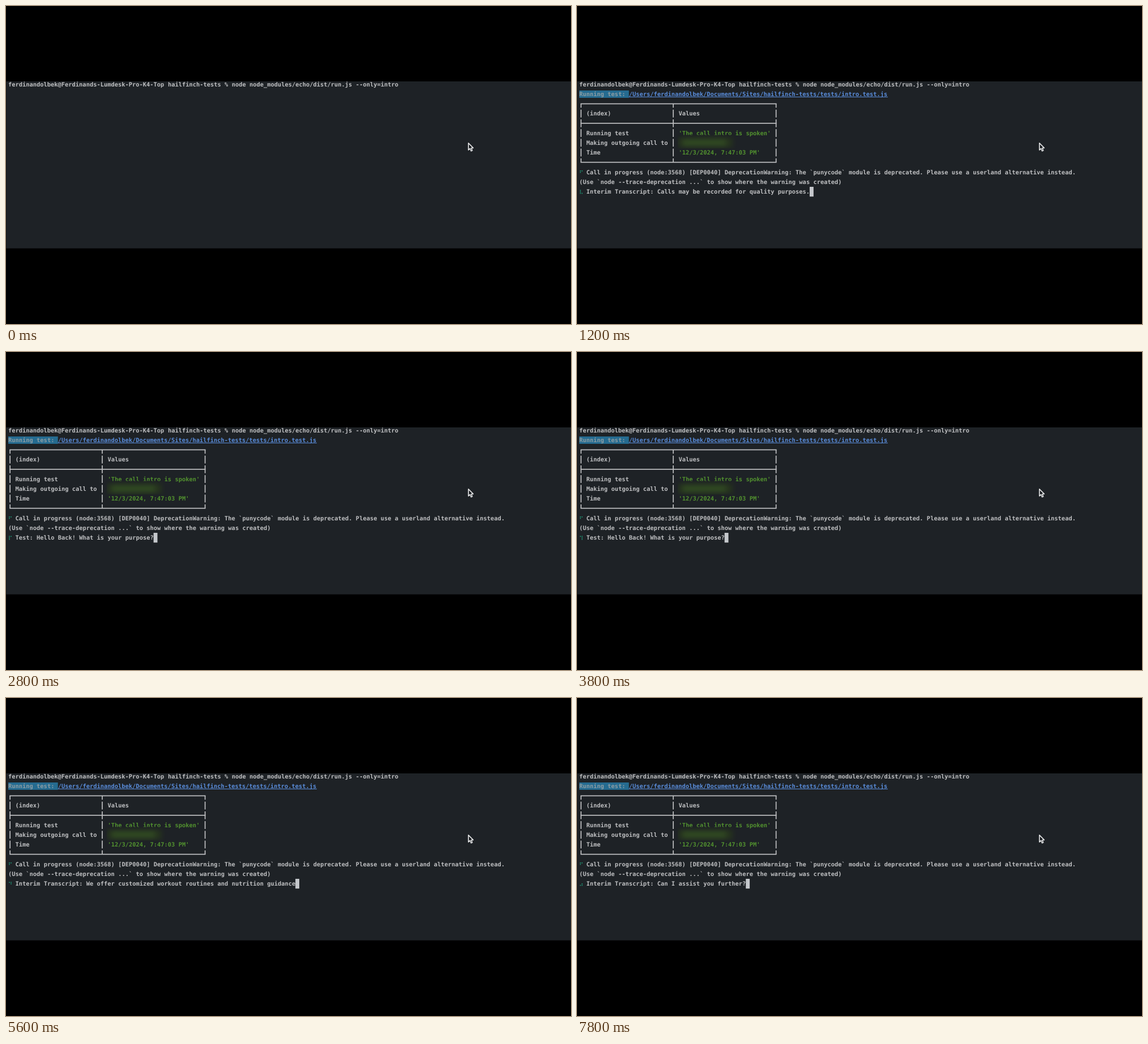
An HTML page with a canvas that plays this animation: 998 by 561 pixels, repeating every 8000 ms.

```html
<!DOCTYPE html>
<html lang="en">
<head>
<meta charset="utf-8">
<title>Terminal call test</title>
<style>
  html, body { margin: 0; width: 100%; height: 100%; overflow: hidden; background: #000; }
  canvas { display: block; }
</style>
</head>
<body>
<canvas id="stage" width="998" height="561"></canvas>
<script>
const ctx = document.getElementById('stage').getContext('2d');

const LOOP = 8000, STEP = 200;
const LEFT = 4, COL = 6.264, TOP = 138.1, ROW = 17.2;
const BG = '#1e2226', GREY = '#bebfc1', GREEN = '#52922f', BLUE = '#5a8ddb', TEAL = '#1fa07c';

const USER = 'ferdinandolbek', PROJECT = 'hailfinch-tests';
const PROMPT = USER + '@Ferdinands-Lumdesk-Pro-K4-Top ' + PROJECT +
  ' % node node_modules/echo/dist/run.js --only=intro';
const PATH = '/Users/' + USER + '/Documents/Sites/' + PROJECT + '/tests/intro.test.js';
const CALL = 'Call in progress';
const WARNING = CALL + ' (node:3568) [DEP0040] DeprecationWarning: The `punycode` module is ' +
  'deprecated. Please use a userland alternative instead.';
const HINT = '(Use `node --trace-deprecation ...` to show where the warning was created)';
const HEARD = 'Interim Transcript: ';

// Each line: start time, label, text, characters at start, characters per step, spinner phase
const LINES = [
  [600, '', CALL, 16, 0, 0],
  [800, HEARD, 'Calls may be recorded for quality purposes.', 3, 20, 2],
  [1400, HEARD, 'Hello! This is your virtual fitness coach, here to guide your journey.', 10, 20, 9],
  [2200, HEARD, 'How can I support your training plan today?', 22, 21, 2],
  [2600, 'Test: ', 'Hello Back! What is your purpose?', 33, 0, 7],
  [4400, HEARD, 'Our purpose is to provide personalized fitness plans', 16, 18, 7],
  [5200, HEARD, 'We offer customized workout routines and nutrition guidance' +
    ' tailored to your individual fitness goals.', 16, 21.5, 6],
  [6200, HEARD, 'The goal is to help you reach your fitness targets anytime and anywhere with a flex', 3, 20, 2],
  [7200, HEARD, 'Let me know if you need any help.', 33, 0, 8],
  [7400, HEARD, 'Can I assist you further?', 5, 10, 0]
];

// Braille dots: bits 0-2 are the left column, bits 3-5 the right one
const SPIN = [...'⠋⠙⠹⠸⠼⠴⠦⠧⠇⠏'].map(c => c.codePointAt(0) - 0x2800);

const colX = col => LEFT + col * COL;
const rowY = row => TOP + row * ROW;

function box(x, y, w, h, color) {
  ctx.fillStyle = color;
  ctx.fillRect(x, y, w, h);
}

// Words are anchored to the character grid
function write(text, col, row, color = GREY) {
  ctx.fillStyle = color;
  const base = Math.round(rowY(row) + 3.7);
  for (const word of text.matchAll(/\S+/g)) {
    ctx.fillText(word[0], colX(col + word.index), base);
  }
}

function spinner(row, phase) {
  const bits = SPIN[Math.floor(phase) % SPIN.length];
  for (let i = 0; i < 6; i++) {
    if (bits >> i & 1) {
      box(i < 3 ? 5.2 : 8.2, rowY(row) - 2.8 + (i % 3) * 2.6, 1.6, 1.6, TEAL);
    }
  }
}

function caret(col, row) {
  box(colX(col) - 0.2, rowY(row) - 8.3, COL + 0.6, ROW, '#c5c8cc');
}

function tableLines() {
  const edges = [0.5, 26.5, 55.5].map(colX);
  const half = 6.9, thick = 1.7;
  for (let row = 2; row <= 8; row++) {
    const y = rowY(row);
    const from = row === 2 ? y : y - half;
    const to = row === 8 ? y : y + half;
    for (const x of edges) box(x - thick / 2, from, thick, to - from, GREY);
    if (row === 2 || row === 4 || row === 8) {
      box(edges[0] - thick / 2, y - thick / 2, edges[2] - edges[0] + thick, thick, GREY);
    }
  }
}

function redaction() {
  box(177.5, 227.5, 104, 24, BG);
  ctx.save();
  ctx.beginPath();
  ctx.rect(177.5, 227.5, 104, 24);
  ctx.clip();
  ctx.filter = 'blur(4px)';
  box(178, 232, 97, 18, '#26331f');
  box(187, 236, 76, 10, '#314b23');
  ctx.restore();
}

function report() {
  box(LEFT, 149, 14 * COL, 13, '#256b90');
  write('Running test:', 0, 1, '#8d9da3');
  write(PATH, 14, 1, BLUE);
  box(colX(14), 160, PATH.length * COL, 1, BLUE);

  tableLines();
  write('(index)', 2, 3);
  write('Values', 28, 3);
  write('Running test', 2, 5);
  write("'The call intro is spoken'", 28, 5, GREEN);
  write('Making outgoing call to', 2, 6);
  write('Time', 2, 7);
  redaction();
  write("'12/3/2024, 7:47:03 PM'", 28, 7, GREEN);
}

function pointer() {
  const points = [[0, 0], [0, 12.2], [2.8, 9.7], [4.8, 14], [6.8, 13.2], [5, 8.9], [8.4, 8.5]];
  ctx.beginPath();
  for (const [x, y] of points) ctx.lineTo(816.8 + x, 241.8 + y);
  ctx.closePath();
  ctx.fillStyle = '#15181b';
  ctx.fill();
  ctx.strokeStyle = '#dedfe0';
  ctx.lineWidth = 1.7;
  ctx.lineJoin = 'round';
  ctx.stroke();
}

function draw(t) {
  box(0, 0, 998, 561, '#000');
  box(0.5, 133, 997.5, 294.6, BG);
  ctx.font = 'bold 10.4px "DejaVu Sans Mono", monospace';
  ctx.textRendering = 'geometricPrecision';

  write(PROMPT, 0, 0);
  if (t >= STEP) {
    report();
    const line = LINES.findLast(l => l[0] <= t);
    spinner(9, line ? 0 : t / STEP * 2.5);
    write(line ? WARNING : CALL, 2, 9);
    if (line) {
      const [start, label, text, first, rate, phase] = line;
      const n = (t - start) / STEP;
      const shown = label + text.slice(0, Math.floor(first + rate * n));
      write(HINT, 0, 10);
      spinner(11, phase + 2.5 * n);
      write(shown, 2, 11);
      caret(2 + shown.length, 11);
    } else {
      caret(2 + CALL.length, 9);
    }
  }
  pointer();
}

function tick() {
  const t = performance.now() % LOOP;
  draw(Math.floor(t / STEP) * STEP);
  requestAnimationFrame(tick);
}
tick();
</script>
</body>
</html>
```
